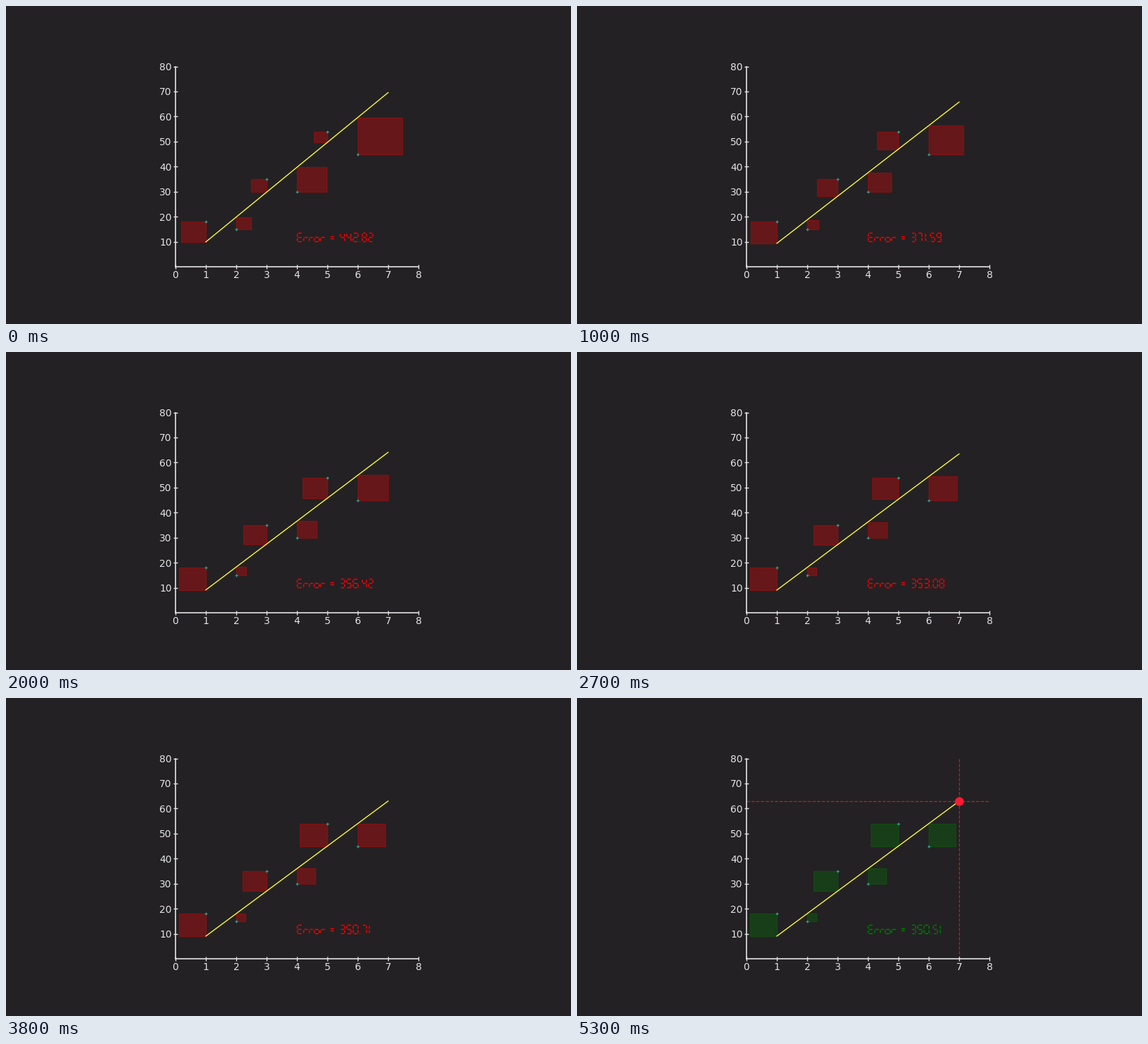
Recreate the animation shown at these times as a matplotlib script. Size 800 px wide and 450 px high, loop 5400 ms.

```python
import numpy as np
import matplotlib.pyplot as plt
from matplotlib.animation import FuncAnimation
from matplotlib.collections import LineCollection
from matplotlib.patches import Rectangle

BG, INK = "#232124", "#e2e2e2"
RED, GREEN = np.array([1, 0, 0]), np.array([0, 0.5, 0])
FRAMES, INTERVAL = 54, 100
STEPS, RATE = 100, 0.001

X = np.array([1, 2, 3, 4, 5, 6])
Y = np.array([18, 15, 35, 30, 54, 45])


def descend():
    """Slope and intercept after each gradient descent step."""
    slope, shift = 10.0, 0.0
    states = [(slope, shift)]
    for _ in range(STEPS):
        miss = slope * X + shift - Y
        slope -= RATE * 2 * np.mean(miss * X)
        shift -= RATE * 2 * np.mean(miss)
        states.append((slope, shift))
    return states


STATES = descend()

# Segment display: cell of width W and height H, y upwards from the baseline
W, H, GAP = 6.6, 12.0, 0.9
M = H / 2
SEGMENTS = {
    "a": ((GAP, H), (W - GAP, H)),
    "b": ((W, H - GAP), (W, M + GAP)),
    "c": ((W, M - GAP), (W, GAP)),
    "d": ((GAP, 0), (W - GAP, 0)),
    "e": ((0, M - GAP), (0, GAP)),
    "f": ((0, H - GAP), (0, M + GAP)),
    "g": ((GAP, M), (W - GAP, M)),
    "h": ((GAP, 4.3), (W - GAP, 4.3)),
    "i": ((GAP, 7.7), (W - GAP, 7.7)),
    "p": ((0, 0), (0.9, 0)),
}
GLYPHS = {
    "0": "abcdef", "1": "bc", "2": "abged", "3": "abgcd", "4": "fgbc",
    "5": "afgcd", "6": "afgedc", "7": "abc", "8": "abcdefg", "9": "abcdfg",
    "E": "afged", "r": "eg", "o": "cdeg", "=": "hi", ".": "p", " ": "",
}
ADVANCE = {"1": 5.2, ".": 3.6, "r": 7.3, " ": 5.6}


def strokes(text, x, y):
    lines = []
    for ch in text:
        left = x - (W - 1.6 if ch == "1" else 0)
        for name in GLYPHS[ch]:
            lines.append([(left + px, y - py) for px, py in SEGMENTS[name]])
        x += ADVANCE.get(ch, 9.1)
    return lines


fig = plt.figure(figsize=(8, 4.5), dpi=100, facecolor=BG)
ax = fig.add_axes([0.3, 0.18, 0.43, 0.63], facecolor="none")
ax.set(xlim=(0, 8), ylim=(0, 80), xticks=range(9), yticks=range(10, 81, 10))
ax.tick_params(direction="inout", length=4, width=1, pad=1.9, color=INK,
               labelcolor=INK, labelsize=10, labelfontfamily="DejaVu Sans")
for side, spine in ax.spines.items():
    spine.set_visible(side in ("left", "bottom"))
    spine.set(color=INK, linewidth=1.2)

ax.plot(X, Y, "+", color="#35a090", ms=3, mew=0.9)
fit, = ax.plot([], [], color="#fbf836", lw=1)
squares = [ax.add_patch(Rectangle((x, y), 0, 0, alpha=0.3, lw=1))
           for x, y in zip(X, Y)]
across, = ax.plot([], [], "--", color="#d81418", lw=0.9, zorder=1.5)
upward, = ax.plot([], [], "--", color="#d81418", lw=0.9, zorder=1.5)
dot, = ax.plot([], [], "o", color="#ff1a33", ms=8, zorder=5)

stage = fig.add_axes([0, 0, 1, 1], facecolor="none")
stage.set(xlim=(0, 800), ylim=(450, 0))
stage.axis("off")
label = LineCollection([], linewidths=1.05, capstyle="butt")
stage.add_collection(label)


def draw(n):
    grow = np.clip((n - 43) / 10, 0, 1)
    step = STEPS if grow > 0 else min(int(2.5 * n + 2.5), STEPS - 1)
    slope, shift = STATES[step]
    guess = slope * X + shift
    end = 7 * slope + shift
    tone = RED + (GREEN - RED) * np.clip((n - 39) / 4, 0, 1)

    fit.set_data([1, 7], [slope + shift, end])
    for square, miss in zip(squares, guess - Y):
        square.set(width=miss / 10, height=miss, color=tone)

    error = np.sum((guess - Y) ** 2)
    label.set_segments(strokes(f"Error = {error:.2f}", 412.3, 333.2))
    label.set_color(tone)

    across.set_data([0, 8 * grow], [end, end])
    upward.set_data([7, 7], [0, 80 * grow])
    for line in (across, upward):
        line.set_visible(grow > 0)
    dot.set_data([7], [end])
    dot.set_visible(grow > 0.85)
    return [fit, *squares, across, upward, dot, label]


anim = FuncAnimation(fig, draw, frames=FRAMES, interval=INTERVAL,
                     repeat=True, repeat_delay=0, blit=False)
plt.show()
```
